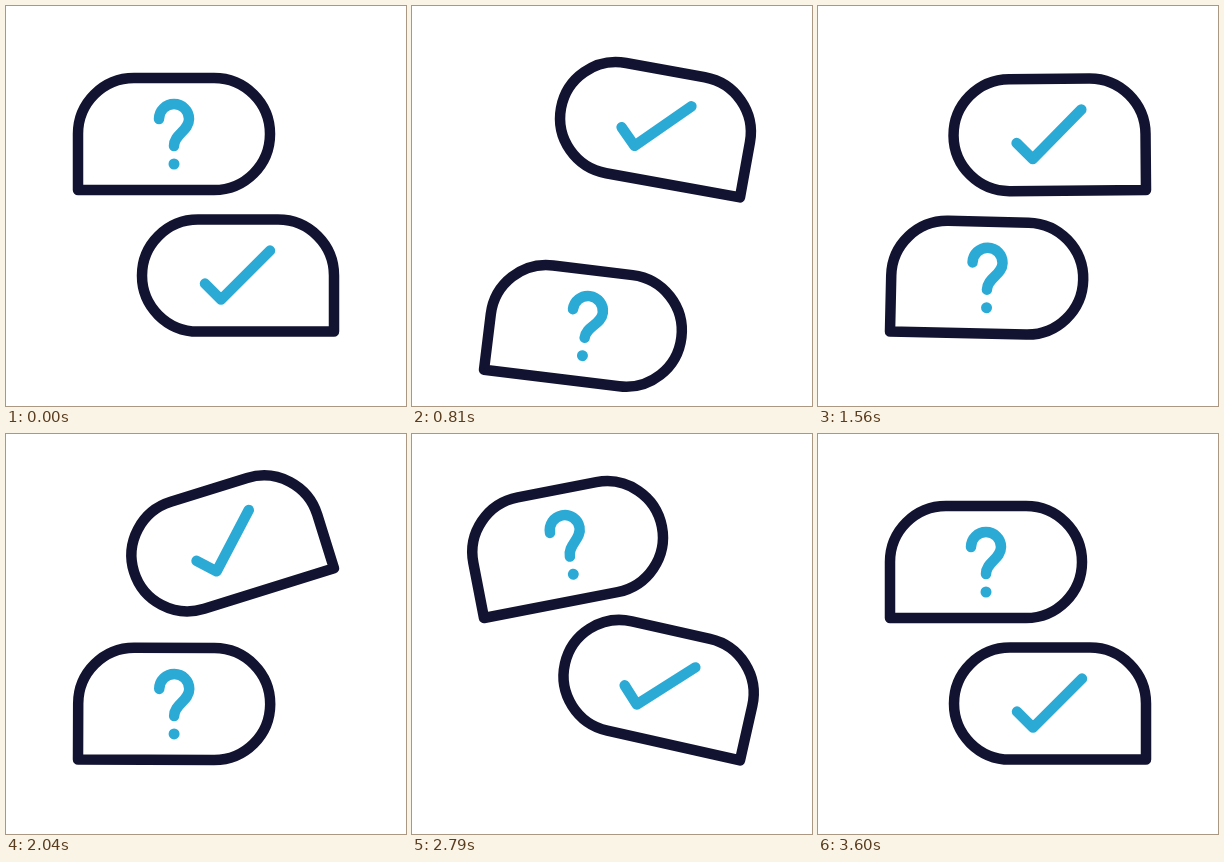
Recreate the animation shown at these times as an HTML page. Size 400 by 400 pixels, loop 5630 ms.

```html
<!DOCTYPE html>
<html lang="en">
<head>
<meta charset="utf-8">
<title>Question and answer bubbles</title>
<style>
html, body { margin: 0; height: 100%; overflow: hidden; background: #fff; }
svg { display: block; width: 100%; height: 100%; }
g { fill: none; stroke-width: 10.5; stroke-linecap: round; stroke-linejoin: round; }
.line { stroke: #121331; }
.mark { stroke: #2caad6; }
.dot { fill: #2caad6; }
</style>
</head>
<body>
<svg viewBox="0 0 400 400">
  <defs>
    <path id="bubble" class="line" d="M0 0V-56A56 56 0 0 1 56-112H136A56 56 0 0 1 136 0Z"/>
  </defs>
  <!-- both bubbles are drawn from their pointed corner -->
  <g id="question">
    <use href="#bubble"/>
    <path class="mark" d="M81-71A15 15 0 0 1 111-71C111-59 96-56 96-44"/>
    <circle class="dot" cx="96" cy="-26" r="5.5"/>
  </g>
  <g id="answer">
    <use href="#bubble" transform="scale(-1 1)"/>
    <path class="mark" d="M-129-48L-113-32L-64-81"/>
  </g>
</svg>
<script>
const LOOP = 5630, MOVE = 3600, STEP = 30, SECOND = 1820;
const TOP = 184, LOW = 325.6;
const question = document.getElementById('question');
const answer = document.getElementById('answer');

// Each track is a list of [time, value] keys, eased in and out.
const exit = {
  y: [[60, TOP], [700, TOP - 340]],
  tilt: [[0, 0], [340, 24]]
};
const rise = {
  y: [[264, LOW], [904, TOP]],
  tilt: [[200, 0], [540, 24.2], [870, -13.2], [1270, 2.2], [1690, 0]]
};
const enter = {
  y: [[327, LOW + 212], [997, LOW]],
  tilt: [[300, 0], [640, 24], [1000, -13.3], [1420, 2.2], [1730, 0]]
};

function at(keys, t) {
  if (t <= keys[0][0]) return keys[0][1];
  for (let i = 1; i < keys.length; i++) {
    const [t0, a] = keys[i - 1], [t1, b] = keys[i];
    if (t < t1) return a + (b - a) * (1 - Math.cos(Math.PI * (t - t0) / (t1 - t0))) / 2;
  }
  return keys[keys.length - 1][1];
}

function place(el, motion, t) {
  const isQuestion = el === question;
  const x = isQuestion ? 72 : 328;
  const angle = at(motion.tilt, t) * (isQuestion ? 1 : -1);
  el.setAttribute('transform', `translate(${x} ${at(motion.y, t)}) rotate(${angle})`);
}

function draw(now) {
  const time = Math.min(Math.floor(now % LOOP / STEP) * STEP, MOVE);
  const swapBack = time >= SECOND;
  const t = swapBack ? time - SECOND : time;
  const [leaver, riser] = swapBack ? [answer, question] : [question, answer];
  place(leaver, t < 500 ? exit : enter, t);
  place(riser, rise, t);
}

let start;
function tick(now) {
  start ??= now;
  draw(now - start);
  requestAnimationFrame(tick);
}
draw(0);
requestAnimationFrame(tick);
</script>
</body>
</html>
```
